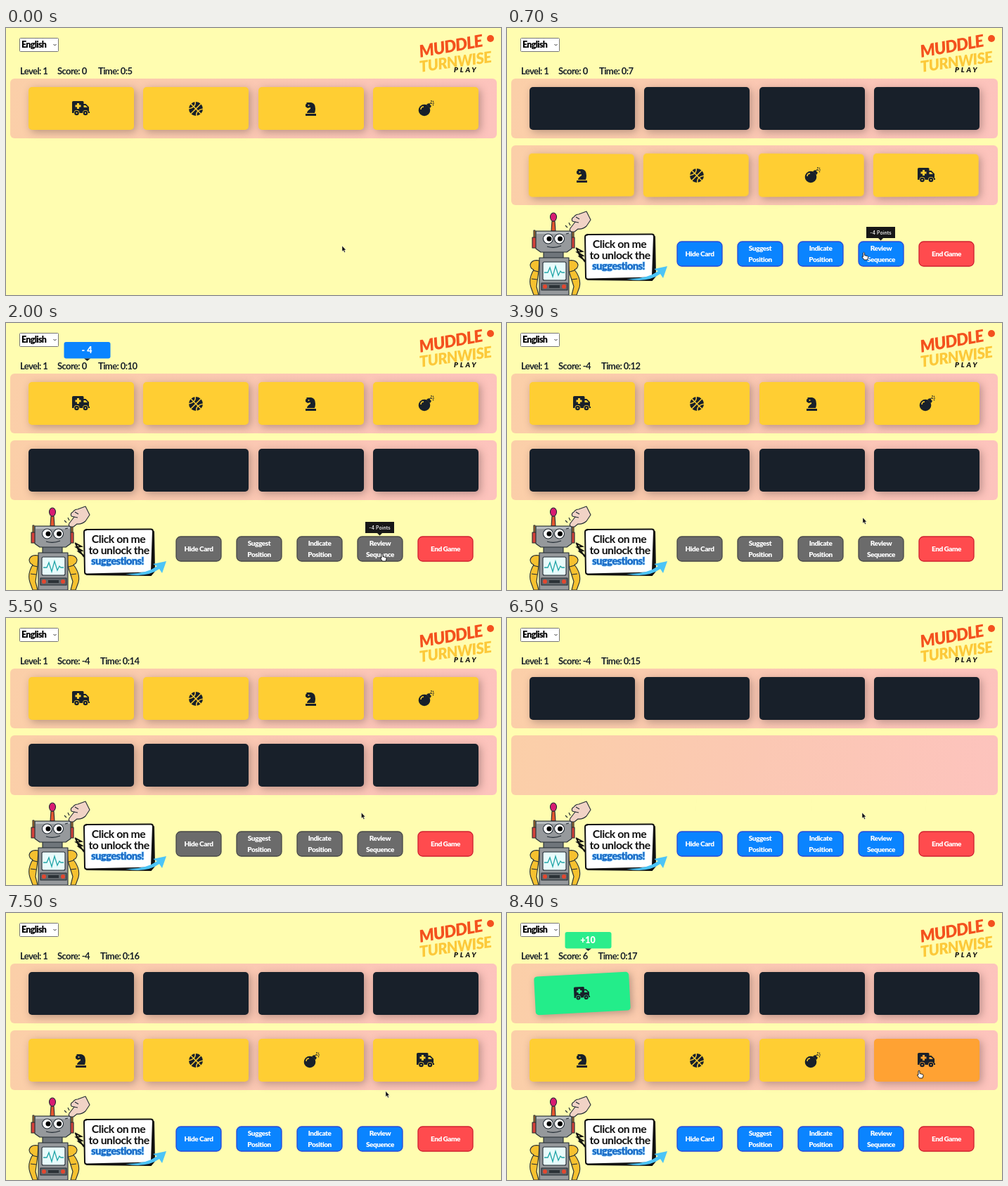
Write an HTML page that moves like this. It is 704 px wide and 380 px high and loops after 8500 ms.

```html
<!DOCTYPE html>
<html lang="en">
<head>
<meta charset="utf-8">
<title>Card game</title>
<style>
  html, body { margin: 0; width: 100%; height: 100%; overflow: hidden; background: #fffdb0; }
  #stage { position: relative; width: 704px; height: 380px; overflow: hidden; }
  #stage > svg { position: absolute; left: 0; top: 0; }
  svg text { font-family: Lato, "Open Sans", sans-serif; font-weight: 700; }
  .panel { position: absolute; left: 6px; width: 692px; height: 85px; border-radius: 6px;
    background: linear-gradient(100deg, #fbcfa8, #fbc8b3 50%, #fdc3bd); }
  .card { position: absolute; top: 12px; width: 150px; height: 61px; border-radius: 5px;
    background: var(--bg); box-shadow: 3px 3px 12px rgba(70, 50, 50, .36); }
  .card svg { position: absolute; left: 62px; top: 18px; overflow: visible; fill: #18202a; }
  .cut { fill: var(--bg); }
  .seam { fill: none; stroke: var(--bg); stroke-width: 1.5; }
  .info { font-size: 13px; letter-spacing: -.6px; fill: #18202a; }
  svg .heavy, svg .btn text { font-weight: 900; }
  .btn text { font-size: 10px; letter-spacing: -.45px; fill: #fff; text-anchor: middle; }
  .ink { stroke: #222b33; stroke-width: 1.1; stroke-linejoin: round; }
</style>
</head>
<body>
<div id="stage">
  <div class="panel" id="top" style="top:72px"></div>
  <div class="panel" id="bottom" style="top:167px"></div>

  <svg width="704" height="380" viewBox="0 0 704 380">
    <!-- header -->
    <rect x="19.500" y="14.500" width="55" height="19" rx="1" fill="#fff" stroke="#767676"/>
    <text class="heavy" x="22" y="28.300" font-size="12.500" letter-spacing="-.7" fill="#000">English</text>
    <path d="M67.500 23l2 2 2-2" fill="none" stroke="#333"/>
    <text class="info" x="20" y="65.500">Level: 1</text>
    <text class="info" x="73" y="65.500" id="score"></text>
    <text class="info" y="65.500" id="time"></text>

    <g font-style="italic">
      <text class="heavy" transform="translate(589 42) rotate(-10)" font-size="24" letter-spacing="-1" fill="#f4511e">MUDDLE</text>
      <text class="heavy" transform="translate(589 63) rotate(-8)" font-size="22" letter-spacing="-.7" fill="#fcc93a">TURNWISE</text>
      <text class="heavy" x="637" y="62.500" font-size="10" letter-spacing="2.800" fill="#111">PLAY</text>
    </g>
    <circle cx="689" cy="15" r="5" fill="#f4511e"/>

    <g id="popup">
      <rect x="82.500" y="27" width="66" height="23.500" rx="3"/>
      <path d="M111 50.500h9l-4.500 3.500z" fill="#18202a"/>
      <text class="heavy" x="115" y="43" font-size="12.500" fill="#fff" text-anchor="middle"></text>
    </g>

    <g id="controls">
      <!-- robot -->
      <g class="ink">
        <path d="M63 289l1-14h4l1 14z" fill="#e4572e"/>
        <ellipse cx="66" cy="269" rx="4.500" ry="6" fill="#d81b72"/>
        <path d="M38 288h2v14h-2zM93 288h2v14h-2z" fill="#f58a1f"/>
        <path d="M36 298h6v15h-6zM90 298h6v15h-6z" fill="#d5433b"/>
        <path d="M46 331q-11-2-13 6 0 5 5 7-8 13-4 25l4 11h7l-3-12 3-22z" fill="#f6c12f"/>
        <path d="M87 331q12-2 14 6 0 5-5 7 10 13 7 25l-4 11h-7l3-12-7-22z" fill="#f6c12f"/>
        <path d="M37 345l8 2M96 345l-7 2M35 357l8 1M100 357l-8 1" fill="none"/>
        <path d="M52 318h28v10h-28z" fill="#6f757b"/>
        <path d="M41 289h51v25l-7 5H48l-7-5z" fill="#96999c"/>
        <path d="M42 290h49v3H42z" fill="#b9bec1" stroke="none"/>
        <circle cx="58.500" cy="300" r="7" fill="#fff"/>
        <circle cx="74.500" cy="300" r="7" fill="#fff"/>
        <path d="M57 311q10 3 20-1" fill="none" stroke-width="1.300"/>
        <path d="M46 327h42v53H46z" fill="#96999c"/>
        <rect x="51" y="333" width="33" height="26" rx="2" fill="#e8fbfb"/>
        <path d="M49 363h37v10H49z" fill="#62676b"/>
      </g>
      <circle cx="60" cy="300" r="3.500"/><circle cx="75.500" cy="300" r="3.500"/>
      <path d="M53 348h5l3-7 4 13 4-15 4 13 3-6 2 2h4" fill="none" stroke="#22a5a8" stroke-width="1.300"/>
      <circle cx="54" cy="368" r="3" fill="#e2472f"/><circle cx="81" cy="368" r="3" fill="#e2472f"/>
      <path d="M60 366h15v4H60z" fill="#2c3237"/>

      <!-- speech bubble -->
      <path d="M98 313l9 5-7 1 8 5-5 1 9 7M99 314l4 9 3 3 5 7" fill="none" stroke="#111" stroke-width="2"/>
      <path d="M116 298l94-1 1 56-5 6-91-1z" fill="#111" stroke="#111" stroke-width="2" stroke-linejoin="round"/>
      <path d="M114 294l92-.5q3 0 3 3l-2 56q0 3-3 3l-89 2q-3 0-3-3l-1-57q0-3 3-3z" fill="#fff" stroke="#111" stroke-width="2"/>
      <g font-size="15.800" letter-spacing="-.5" text-anchor="middle" fill="#111">
        <text x="160" y="313">Click on me</text>
        <text x="160.500" y="328.500">to unlock the</text>
        <text x="158.500" y="343.500" font-size="15" letter-spacing="-.75" class="heavy" fill="#1769c5" stroke="#a9dcff" stroke-width="1.500" paint-order="stroke">suggestions!</text>
      </g>
      <path d="M170 357q28 1 45-11l-6-3 19-4-6 17-4-6q-18 13-48 7z" fill="#4cc4f7"/>
      <!-- pointing hand -->
      <path class="ink" d="M92 290q-4-1-2-5l7-9-4-1q-2-4 2-6 3-4 7-4l11-4 6 12-6 9q-6 5-12 4l-5 4z" fill="#f1d3c6" stroke-width="1.500"/>
      <path d="M97 276l5 1M98 269l5 3" fill="none" stroke="#222b33" stroke-width="1.200"/>
      <path d="M86 284l-3-3M90 281l-2-4M88 292l-4 1" stroke="#222b33" stroke-width="1.200"/>

      <g id="buttons"></g>
      <g id="tip">
        <path d="M511 283h41v16h-17l-3.500 3.500-3.500-3.500h-17z" fill="#171717"/>
        <text x="531.500" y="293.500" font-size="7" fill="#fff" text-anchor="middle" style="font-family:Inter,sans-serif;font-weight:500">-4 Points</text>
      </g>
    </g>
    <path id="arrow" d="M0 0v8l1.800-1.600 1.400 3 1.300-.6-1.300-2.900H5.500z" fill="#111" stroke="#fff" stroke-width=".4"/>
    <path id="hand" d="M1 1q1-1.500 2 0v3.500l4 1q1.500.5 1 2.500l-1 3H2.500L-.5 7q0-1.500 1.500-.5z" fill="#fff" stroke="#111" stroke-width=".9"/>
  </svg>
</div>

<script>
const LOOP = 8500, STEP = 100;
const REVIEW = 1450, RESUME = 6487, DEAL = 300, MATCH = 8300, FLIP = 550;
const YELLOW = '#ffce33', DARK = '#18202a', GREEN = '#23ed8a', ORANGE = '#ffa233', BLUE = '#0a84ff';
const $ = id => document.getElementById(id);
const clamp = v => Math.max(0, Math.min(1, v));
const mix = (a, b, k) => a + (b - a) * k;
const easeIn = k => Math.pow(k, 1.7);
const smooth = k => k * k * (3 - 2 * k);

const ICONS = {
  truck: `<path d="M2 2h13q1.500 0 1.500 1.500V6h3l4.500 4.500V17h1v2H0V3.500Q0 2 2 2z"/>
    <path class="cut" d="M7 5h3v2.500h2.500v3H10V13H7v-2.500H4.500v-3H7zM16.500 8h2.500l3 3h-5.500z"/>
    <circle class="cut" cx="6.500" cy="19" r="4"/><circle class="cut" cx="19" cy="19" r="4"/>
    <circle cx="6.500" cy="19" r="3.300"/><circle cx="19" cy="19" r="3.300"/>
    <circle class="cut" cx="6.500" cy="19" r="1"/><circle class="cut" cx="19" cy="19" r="1"/>`,
  ball: `<circle cx="13" cy="13" r="10"/>
    <path class="seam" d="M5 5l16 16M21 5L5 21M12 2q2 9-10 11M14 24q-2-9 10-11"/>`,
  knight: `<path d="M6 4h7q6 1 6 9 0 3-1 6H7q0-3 5-6v-2l-4 1-3-2V7l2-2zM5 20h15v3H5z"/>
    <circle class="cut" cx="9.500" cy="8" r="1"/>`,
  bomb: `<circle cx="11" cy="15" r="8.300"/><path d="M14 7l3-2 4 4-2 3z"/>
    <path d="M18 7q2-4 4-1M21 3V1M23 5h2M23 3l1-1M23 7l1 1" fill="none" stroke="#18202a" stroke-width="1.200"/>
    <path class="seam" d="M6 14q0-4 4-4"/>`
};

function makeRow(id, names) {
  return names.map((name, i) => {
    const card = document.createElement('div');
    card.className = 'card';
    card.style.left = 25.5 + i * 163.5 + 'px';
    card.innerHTML = `<svg width="26" height="26" viewBox="0 0 26 26">${ICONS[name]}</svg>`;
    $(id).append(card);
    return card;
  });
}
const topRow = makeRow('top', ['truck', 'ball', 'knight', 'bomb']);
const bottomRow = makeRow('bottom', ['knight', 'ball', 'bomb', 'truck']);

const LABELS = [['Hide Card'], ['Suggest', 'Position'], ['Indicate', 'Position'], ['Review', 'Sequence'], ['End Game']];
$('buttons').innerHTML = LABELS.map((lines, i) => {
  const x = 242 + i * 86, w = i === 4 ? 78 : 64;
  const words = lines.map((s, n) =>
    `<text x="${x + w / 2}" y="${lines.length > 1 ? 317 + n * 15.5 : 325}">${s}</text>`).join('');
  return `<g class="btn"><rect x="${x}" y="304" width="${w}" height="35" rx="6.500" fill="#ff4b4e" stroke="#cf2030" stroke-width="1.300"/>${words}</g>`;
}).join('');
const helpButtons = [...document.querySelectorAll('.btn rect')].slice(0, 4);

const CLOCK = [[0, '0:5'], [300, '0:6'], [600, '0:7'], [800, '0:8'], [1100, '0:9'], [1400, '0:10'], [2800, '0:11'],
  [3900, '0:12'], [4800, '0:13'], [5500, '0:14'], [6500, '0:15'], [7400, '0:16'], [8200, '0:17']];
const PATH = [[0, 478, 310], [300, 478, 310], [1100, 533, 328], [2900, 533, 328], [3800, 506, 277],
  [6900, 505, 277], [8200, 584, 224], [LOOP, 584, 224]];
const TURN = [[0, 90], [.4, -20], [.6, 10], [.8, -5], [1, 0]];
const TADA = [[0, 1, 0], [.1, .9, -3], [.2, .9, -3], [.3, 1.1, 3]];

function track(keys, t, ease) {
  let i = 0;
  while (i < keys.length - 2 && t >= keys[i + 1][0]) i++;
  const a = keys[i], b = keys[i + 1];
  const k = ease(clamp((t - a[0]) / (b[0] - a[0])));
  return a.slice(1).map((v, n) => mix(v, b[n + 1], k));
}

function paint(card, color) {
  card.style.setProperty('--bg', color);
  card.firstChild.style.display = color === DARK ? 'none' : '';
}

// A row turns in about its vertical axis, fading in as it swings
function setRow(row, color, age = FLIP) {
  const p = clamp(age / FLIP);
  for (const card of row) {
    paint(card, color);
    card.style.opacity = easeIn(clamp(p / .6));
    card.style.transform = p < 1 ? `perspective(240px) rotateY(${track(TURN, p, easeIn)[0]}deg)` : 'none';
  }
}

function setPopup(text, color, alpha) {
  const box = $('popup');
  box.style.opacity = alpha;
  box.children[0].setAttribute('fill', color);
  box.children[2].textContent = text;
}

function draw(t) {
  const dealt = t >= DEAL, review = t >= REVIEW && t < RESUME, matched = t >= MATCH;
  $('bottom').style.display = $('controls').style.display = dealt ? '' : 'none';
  if (review) {
    setRow(topRow, YELLOW, t - REVIEW);
    setRow(bottomRow, DARK);
  } else {
    setRow(topRow, dealt ? DARK : YELLOW);
    setRow(bottomRow, YELLOW, t - (t < REVIEW ? DEAL : RESUME));
  }
  for (const b of helpButtons) {
    b.setAttribute('fill', review ? '#6b6b6b' : BLUE);
    b.setAttribute('stroke', review ? '#484848' : '#2a49d8');
  }

  const [x, y] = track(PATH, t, smooth);
  const onReview = dealt && x > 500 && x < 564 && y > 303 && y < 339;
  const onCard = t > RESUME && x > 522 && y < 240;
  if (onCard) paint(bottomRow[3], ORANGE);
  if (matched) {
    const [s, r] = track(TADA, (t - MATCH) / 1000, k => k);
    paint(topRow[0], GREEN);
    topRow[0].style.transform = `scale(${s}) rotate(${r}deg)`;
  }

  $('tip').style.display = onReview ? '' : 'none';
  for (const [id, on] of [['hand', onReview || onCard], ['arrow', !(onReview || onCard)]]) {
    $(id).style.display = on ? '' : 'none';
    $(id).setAttribute('transform', `translate(${x} ${y})`);
  }

  const score = matched ? '6' : t >= 2700 ? '-4' : '0';
  $('score').textContent = 'Score: ' + score;
  $('time').textContent = 'Time: ' + CLOCK.filter(c => c[0] <= t).pop()[1];
  $('time').setAttribute('x', { 0: 131, 6: 129.5, '-4': 134 }[score]);

  if (matched) setPopup('+10', GREEN, clamp(.6 + (t - MATCH) / 280));
  else setPopup('- 4', BLUE, Math.min(clamp((t - 1360) / 180), clamp((2700 - t) / 200)));
}

function tick() {
  draw(Math.floor((performance.now() % LOOP) / STEP) * STEP);
  requestAnimationFrame(tick);
}
tick();
</script>
</body>
</html>
```
